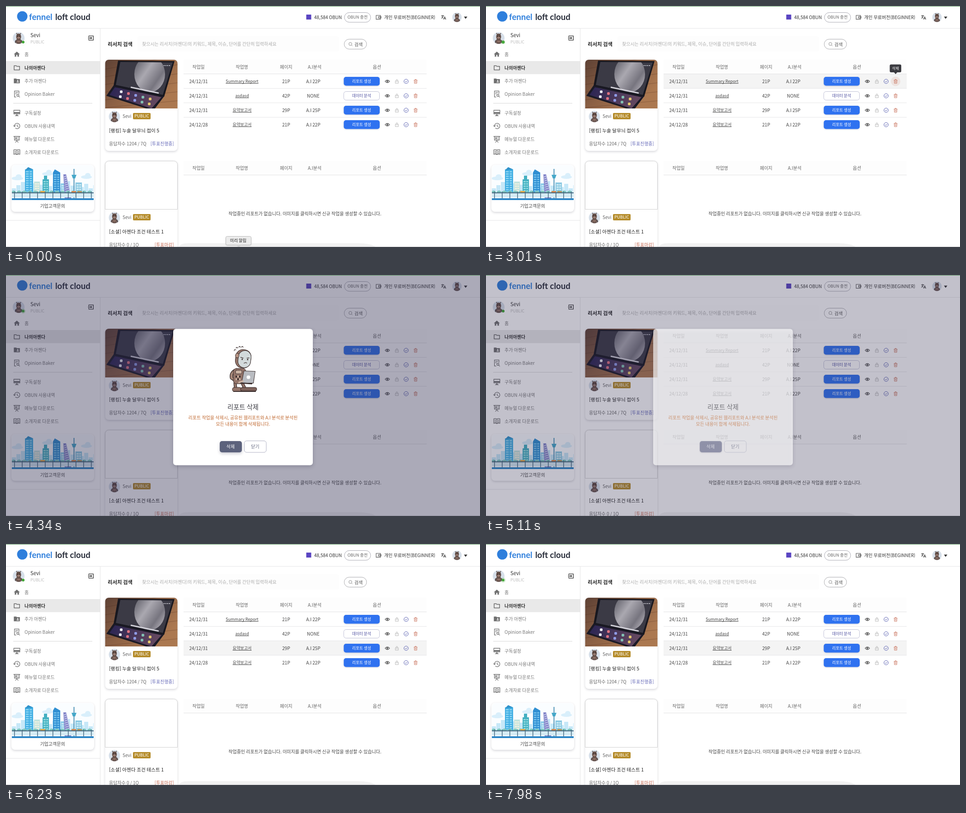
Recreate the animation shown at these times as an HTML page with a canvas. Size 1049 by 534 pixels, loop 8 s.

```html
<!DOCTYPE html>
<html lang="ko">
<head>
<meta charset="utf-8">
<title>Report list</title>
<style>
html, body { margin: 0; width: 100%; height: 100%; overflow: hidden; background: #fff; }
canvas { display: block; width: 1049px; height: 534px; }
</style>
</head>
<body>
<canvas id="stage"></canvas>
<script>
const W = 1049, H = 534, LOOP = 8000;
const FONT = '"Noto Sans CJK KR", "Noto Sans CJK", "Noto Sans", sans-serif';
const canvas = document.getElementById('stage');
const dpr = window.devicePixelRatio || 1;
canvas.width = W * dpr;
canvas.height = H * dpr;
const g = canvas.getContext('2d');

const clamp = v => Math.min(1, Math.max(0, v));
const ramp = (t, start, length) => clamp((t - start) / length);
const easeOut = p => 1 - (1 - p) ** 3;
const easeInOut = p => p * p * (3 - 2 * p);

// y is the vertical middle of the line
function text(str, x, y, { size = 10, color = '#444', weight = 400, align = 'left', font = FONT, underline } = {}) {
  g.font = `${weight} ${size}px ${font}`;
  g.textAlign = align;
  g.fillStyle = color;
  const base = y + size * 0.37;
  g.fillText(str, x, base);
  if (underline) {
    const w = g.measureText(str).width;
    g.fillRect(x - w / 2, Math.round(base + 1), w, 1);
  }
}

function box(x, y, w, h, r, { fill, stroke, shadow } = {}) {
  g.save();
  g.beginPath();
  g.roundRect(x, y, w, h, r);
  if (shadow) {
    g.shadowColor = shadow[0];
    g.shadowBlur = shadow[1] * dpr;
    g.shadowOffsetY = shadow[2] * dpr;
  }
  if (fill) { g.fillStyle = fill; g.fill(); }
  g.shadowColor = 'transparent';
  if (stroke) { g.strokeStyle = stroke; g.lineWidth = 1; g.stroke(); }
  g.restore();
}

function rect(x, y, w, h, color) {
  g.fillStyle = color;
  g.fillRect(x, y, w, h);
}

function poly(points, color) {
  g.beginPath();
  points.forEach(([x, y]) => g.lineTo(x, y));
  g.closePath();
  g.fillStyle = color;
  g.fill();
}

function oval(x, y, rx, ry, color, stroke) {
  g.beginPath();
  g.ellipse(x, y, rx, ry, 0, 0, Math.PI * 2);
  g.fillStyle = color;
  g.fill();
  if (stroke) { g.strokeStyle = stroke; g.lineWidth = 1; g.stroke(); }
}

function line(d, color, width = 1) {
  g.strokeStyle = color;
  g.lineWidth = width;
  g.stroke(new Path2D(d));
}

const icons = {
  home: 'M12 3L2 12h3v8h5v-6h4v6h5v-8h3z',
  folder: 'M3 5h7l2 2h9v12H3z',
  shared: 'M2 4h8l2 2h10v14H2zM13 11a2 2 0 1 1 4 0a2 2 0 1 1-4 0zM11 17q0-3 4-3t4 3z',
  report: 'M10 22H4V2h15v9M7 7h9M7 11h4M19 16a3.5 3.5 0 1 1-7 0a3.5 3.5 0 1 1 7 0zM18 19l4 4',
  screen: 'M2 3h20v12H2zM2 10h20M2 12h20M12 15v3M8 21l4-3 4 3z',
  history: 'M4 12a9 9 0 1 1 3 6.5M1 10l3 4 4-4M13 7v5l4 3',
  board: 'M1 3h22M4 3v12h16V3M12 15v3M7 23l5-5 5 5M8 7h3v4H8zM14 7h3M14 11h3',
  book: 'M12 5Q7 2 2 4v15q5-2 10 1q5-3 10-1V4q-5-2-10 1v15M5 8h4M5 12h4M5 16h4M15 8h4M15 12h4M15 16h4',
  exit: 'M4 9V4h17v16H4v-5M1 12h14M11 8l4 4-4 4',
  eye: 'M1 12Q12-1 23 12Q12 25 1 12zM15 12a3 3 0 1 1-6 0a3 3 0 1 1 6 0z',
  lock: 'M4 10h16v12H4zM8 10V6a4 4 0 0 1 8 0v4M12 14v3',
  check: 'M22 12a10 10 0 1 1-20 0a10 10 0 1 1 20 0zM7 12l4 4 6-7',
  trash: 'M3 6h18M9 6V2h6v4M5 6l1 16h12l1-16M10 10v8M14 10v8',
  language: 'M2 5h13M8 2v3M12 5Q10 12 3 17M5 8q2 5 7 8M13 22l5-12 5 12M15 18h6',
  wallet: 'M3 4h18v16H3zM13 9h10v6H13z',
  search: 'M19 11a8 8 0 1 1-16 0a8 8 0 1 1 16 0zM17 17l5 5'
};

function icon(name, x, y, size, color, filled, width = 2) {
  g.save();
  g.translate(x - size / 2, y - size / 2);
  g.scale(size / 24, size / 24);
  const path = new Path2D(icons[name]);
  if (filled) {
    g.fillStyle = color;
    g.fill(path, 'evenodd');
  } else {
    g.strokeStyle = color;
    g.lineWidth = width;
    g.stroke(path);
  }
  g.restore();
}

function avatar(x, y, r) {
  g.save();
  g.translate(x, y);
  g.scale(r / 13, r / 13);
  oval(0, 0, 13, 13, '#d6dfe9');
  g.beginPath();
  g.arc(0, 0, 13, 0, Math.PI * 2);
  g.clip();
  line('M-3-8l-2-3M3-8l2-3', '#5a4b47', 1.5);
  oval(0, 8, 6, 8, '#6b5650');
  line('M-6 5q-2 4-1 8M6 5q2 4 1 8', '#4c3f3d', 2);
  oval(0, -3, 5.5, 7, '#655049');
  oval(0, -1, 3.2, 2.6, '#9a7c72');
  oval(-2, -4, 1, 1, '#211b1b');
  oval(2, -4, 1, 1, '#211b1b');
  rect(-3, 6, 6, 3, '#937469');
  g.restore();
}

function header() {
  oval(36, 23, 11.5, 11.5, '#2f7fdc');
  const logo = { size: 18.5, weight: 700, font: 'Lato, sans-serif' };
  text('fennel', 51, 24, { ...logo, color: '#2f7fdc' });
  text('loft cloud', 109, 24, { ...logo, color: '#262b38' });
  box(664.5, 19, 11, 11, 0, { fill: '#5a45c2' });
  text('48,584 OBUN', 682, 25, { color: '#333', weight: 500 });
  box(749, 14.5, 58, 21.5, 11, { stroke: '#a9a9b2' });
  text('OBUN 충전', 778, 25, { size: 9.1, color: '#666', align: 'center' });
  icon('wallet', 824, 25, 13, '#555');
  text('개인 무료버전(BEGINNER)', 837, 25, { color: '#333', weight: 500 });
  icon('language', 968, 25, 12, '#444', false, 2.4);
  avatar(998, 25, 10.5);
  poly([[1013.5, 23.5], [1021, 23.5], [1017.2, 28.5]], '#333');
  rect(0, 49, W, 1, '#e6e6e8');
}

const menu = [
  ['home', '홈', 107, true], ['folder', '나의아젠다', 137], ['shared', '추가 아젠다', 166, true],
  ['report', 'Opinion Baker', 195], ['screen', '구독설정', 237], ['history', 'OBUN 사용내역', 266],
  ['board', '메뉴얼 다운로드', 295], ['book', '소개자료 다운로드', 324]
];

const cardShadow = ['rgba(50,50,70,.2)', 5, 2];

function sidebar(t) {
  rect(208, 50, 1, H, '#e4e4e6');
  rect(0, 474.5, 208, 1, '#e4e4e6');
  avatar(28, 71, 13);
  statusDot(t);
  text('Sevi', 54, 65, { size: 11.2, color: '#333', weight: 500 });
  text('PUBLIC', 54, 80, { size: 8.9, color: '#bdbdbd' });
  icon('exit', 188, 71, 14, '#333', false, 2.3);
  rect(0, 122, 208, 29, '#e9e9e9');
  for (const [name, label, y, filled] of menu) {
    const active = y === 137;
    icon(name, 24, y, 16, active ? '#555' : '#707070', filled, 1.9);
    text(label, 41, y, { color: active ? '#333' : '#777', weight: active ? 700 : 400 });
  }
  rect(16, 215, 175, 1, '#d8d8d8');
  box(12, 352, 183, 104, 8, { fill: '#fff', shadow: cardShadow });
  city();
  text('기업고객문의', 103, 443, { color: '#444', align: 'center' });
}

function statusDot(t) {
  const p = ((t - 200 + 1200) % 1200) / 1200;
  const e = easeInOut(p);
  g.save();
  g.globalAlpha = 1 - e;
  g.beginPath();
  g.arc(38, 80, 3 * (0.8 + 1.6 * e), 0, Math.PI * 2);
  g.strokeStyle = '#43a838';
  g.lineWidth = 0.8;
  g.stroke();
  g.restore();
  oval(38, 80, 3, 3, '#43a838');
}

function city() {
  g.save();
  g.beginPath();
  g.roundRect(13, 353, 181, 77, [8, 8, 0, 0]);
  g.clip();
  rect(13, 353, 181, 77, '#fafdff');
  for (const [x, y, w] of [[25, 382, 26], [92, 372, 24], [178, 379, 24]]) {
    oval(x, y, w / 2, 4, '#d9effb');
    oval(x + 3, y - 4, w / 4, 5, '#d9effb');
  }
  for (let i = 0; i < 19; i++) {
    const h = 12 + (i * 7 % 17);
    rect(13 + i * 10, 416 - h, 9, h, '#c6e8f8');
  }
  tower(42, 362, 18, '#41aee3', '#92d8f4');
  poly([[42, 364], [49, 357], [60, 362]], '#2f92ca');
  tower(62, 389, 13, '#c5e4de', '#f5f2e2');
  tower(81, 384, 14, '#43b0c2', '#9adfe2');
  rect(84, 376, 7, 8, '#43b0c2');
  tower(104, 369, 16, '#2f8fd2', '#78c5ef');
  poly([[104, 369], [108, 362], [120, 369]], '#2f8fd2');
  tower(121, 393, 10, '#8ecce9', '#d8f1fa');
  poly([[127, 373], [133, 373], [145, 428], [130, 428]], '#8285c8');
  for (let i = 0; i < 11; i++) line(`M${128 + i * .45} ${379 + i * 4.5}l${7 + i * .5}-3`, '#cfd0ee', 1.5);
  rect(149.5, 361, 2, 67, '#4b91b6');
  poly([[145, 374], [156, 374], [153, 382], [148, 382]], '#45a8c9');
  tower(154, 391, 14, '#8ecae3', '#d7f1f7');
  for (let x = 17; x < 194; x += 12) oval(x, 413, 5, 4, '#7cc4bd');
  rect(13, 413, 181, 2, '#47697f');
  rect(13, 415, 181, 9, '#d4ebf4');
  for (let x = 18; x < 194; x += 17) rect(x, 411, 1.5, 15, '#47697f');
  rect(13, 426, 181, 4, '#2d86c6');
  for (const [x, c] of [[76, '#e8a640'], [145, '#d6854e'], [158, '#b3945d']]) rect(x, 410, 10, 3, c);
  g.restore();
}

function tower(x, y, w, dark, light) {
  rect(x, y, w, 424 - y, dark);
  for (let r = y + 4; r < 420; r += 5) {
    rect(x + 2, r, w * .35, 2.5, light);
    rect(x + w * .58, r, w * .28, 2.5, light);
  }
}

function photo() {
  g.save();
  g.beginPath();
  g.roundRect(219.5, 119, 160, 108, [8, 8, 0, 0]);
  g.clip();
  const wood = g.createLinearGradient(219, 119, 330, 227);
  wood.addColorStop(0, '#5c4034');
  wood.addColorStop(.5, '#8b6044');
  wood.addColorStop(1, '#ab7850');
  rect(219, 119, 161, 108, wood);
  for (let i = 0; i < 7; i++) line(`M219 ${140 + i * 17}l161 ${i * 3 - 30}`, 'rgba(60,34,20,.2)', 1.5);
  // upright half with its wallpaper
  const screen = [[253, 124], [369, 125], [347, 197], [243, 175]];
  poly([[248, 121], [373, 122], [350, 201], [238, 177]], '#17171f');
  poly(screen, '#3b3a45');
  g.save();
  g.beginPath();
  screen.forEach(p => g.lineTo(...p));
  g.clip();
  const orb = g.createLinearGradient(282, 125, 354, 175);
  orb.addColorStop(0, '#5d5c66');
  orb.addColorStop(.4, '#aaa8b0');
  orb.addColorStop(.75, '#77757f');
  orb.addColorStop(1, '#b3b0b8');
  oval(318, 151, 34, 40, orb);
  g.restore();
  for (let i = 0; i < 4; i++) rect(349 + i * 4, 131, 2, 2, '#d5d5dd');
  // lying half with its icons
  const deck = g.createLinearGradient(235, 180, 325, 225);
  deck.addColorStop(0, '#2b2553');
  deck.addColorStop(1, '#63475f');
  poly([[238, 176], [350, 200], [326, 232], [222, 199]], '#1b1a26');
  poly([[241, 180], [344, 202], [322, 227], [229, 197]], deck);
  line('M276 180L338 193', '#cfced6', 3);
  const dots = ['#e9e9ef', '#8e9ae4', '#e3c76c', '#dd7280', '#82c0b3'];
  for (let i = 0; i < 10; i++) {
    const row = Math.floor(i / 5), col = i % 5;
    box(252 + col * 16 - row * 2, 187 + row * 11 + col * 4, 6, 6, 2, { fill: dots[(i * 3) % 5] });
  }
  g.restore();
}

function card(y, title, count, state, color, image) {
  box(219.5, y, 160, 202, 8, { fill: '#fff', shadow: cardShadow });
  if (image) photo();
  else box(219.5, y + .5, 160, 107, [8, 8, 0, 0], { stroke: '#cfcfcf' });
  avatar(240, y + 126, 12.5);
  text('Sevi', 258, y + 125, { color: '#666' });
  box(281, y + 118, 39, 14, 2, { fill: '#b58c2b' });
  text('PUBLIC', 300.5, y + 125, { size: 9.4, color: '#fff', align: 'center' });
  text(title, 228, y + 157, { size: 10.7, color: '#222', weight: 500 });
  text(count, 228, y + 186.5, { color: '#666' });
  text(state, 371.5, y + 186.5, { size: 9.8, color, align: 'right' });
}

function tableHead(y) {
  rect(393, y - 16, 538, 31, '#fdfdfd');
  [['작업일', 426], ['작업명', 522], ['페이지', 620], ['A.I분석', 683], ['옵션', 821]]
    .forEach(([label, x]) => text(label, x, y, { color: '#666', align: 'center' }));
  rect(393, y + 15, 538, 1, '#e2e2e4');
}

const rows = [
  ['24/12/31', 'Summary Report', '21P', 'A.I 22P'],
  ['24/12/31', 'asdasd', '42P', 'NONE'],
  ['24/12/31', '요약보고서', '29P', 'A.I 25P'],
  ['24/12/28', '요약보고서', '21P', 'A.I 22P']
];

function table(hovered, trashGlow) {
  tableHead(135);
  rows.forEach(([date, name, pages, ai], i) => {
    const y = 167 + i * 32;
    if (i === hovered) rect(393, y - 16, 538, 32, '#f4f4f4');
    if (i < 3) rect(393, y + 15, 538, 1, '#e6e6e8');
    text(date, 426, y, { align: 'center' });
    text(name, 522.5, y, { size: 9.1, align: 'center', underline: true });
    text(pages, 620, y, { align: 'center' });
    text(ai, 680, y, { align: 'center' });
    const plain = ai === 'NONE';
    if (plain) box(747.5, y - 9.5, 79, 19, 5, { fill: '#fff', stroke: '#bfc0d6' });
    else box(747.5, y - 10, 79.5, 19.5, 5, { fill: '#2f72f0', shadow: ['rgba(40,60,120,.25)', 3, 1] });
    text(plain ? '데이터 분석' : '리포트 생성', 787, y, {
      size: 8.7, weight: 500, align: 'center', color: plain ? '#4b4d9f' : '#fff'
    });
    if (i === 0 && trashGlow) oval(906.5, y, 10.5, 10.5, `rgba(201,117,95,${.13 * trashGlow})`);
    icon('eye', 844, y, 11, '#333', false, 2.4);
    icon('lock', 865, y, 10, '#aaa');
    icon('check', 885.5, y, 11.5, '#5259ad');
    icon('trash', 906.5, y, 10.5, '#c8705b');
  });
}

function content(hovered, trashGlow) {
  text('리서치 검색', 225, 85, { size: 11.4, color: '#222', weight: 700 });
  box(291, 67, 446, 34, 5, { fill: '#fdfdfd' });
  text('찾으시는 리서치(아젠다)의 키워드, 제목, 이슈, 단어를 간단히 입력하세요', 301, 84, { color: '#aaa' });
  box(748.5, 73.5, 49.5, 22, 11, { stroke: '#a9a9ad' });
  icon('search', 762.5, 84.5, 10, '#777');
  text('검색', 771, 85, { color: '#555' });
  card(119, '[랭킹] 누솔 달무늬 접이 5', '응답자수 1204 / 7Q', '[투표진행중]', '#6468b8', true);
  card(343, '[소셜] 아젠다 조건 테스트 1', '응답자수 0 / 1Q', '[투표마감]', '#c4674f', false);
  table(hovered, trashGlow);
  tableHead(359);
  text('작업중인 리포트가 없습니다. 이미지를 클릭하시면 신규 작업을 생성할 수 있습니다.', 661.5, 460, { align: 'center' });
}

function dock() {
  g.beginPath();
  g.moveTo(383, H);
  g.quadraticCurveTo(386, 525.5, 402, 525.5);
  g.lineTo(780, 525.5);
  g.quadraticCurveTo(808, 526, 818, H);
  g.fillStyle = '#f2f2f2';
  g.fill();
}

function dockLabel(alpha) {
  g.save();
  g.globalAlpha = alpha;
  box(486.5, 510.5, 56, 19, 3, { fill: '#ececec', stroke: '#bcbcbc', shadow: ['rgba(0,0,0,.2)', 3, 1] });
  poly([[508, 529.5], [522, 529.5], [515, 534]], '#d5d5d5');
  text('미리 알림', 514, 520, { size: 9.3, color: '#222', weight: 500, align: 'center' });
  g.restore();
}

function tooltip(alpha) {
  g.save();
  g.globalAlpha = alpha;
  box(893.5, 129.5, 25.5, 17.5, 3, { fill: '#3b3b40' });
  poly([[903, 147], [910, 147], [906.5, 151]], '#3b3b40');
  text('삭제', 906.3, 138.3, { size: 8.2, color: '#fff', weight: 500, align: 'center' });
  g.restore();
}

function robot() {
  const ink = '#3a2d2c', brown = '#94756a', tan = '#cbb2a2';
  g.save();
  g.lineJoin = g.lineCap = 'round';
  line('M505 168l1-3 3 1M509 162l2-2 2 2M515 160l2-2 2 2M521 160l2-2 2 2', ink, 1.1);
  line('M507 240l1 10M524 242l4 8', ink, 7);
  line('M507 240l1 10M524 242l4 8', brown, 4.5);
  box(501, 249, 20, 9, 4, { fill: brown, stroke: ink });
  box(519, 249, 36, 8, 4, { fill: '#7d625a', stroke: ink });
  rect(503, 257, 50, 2, ink);
  line('M506 212q-9 6-7 16l9 6', ink, 7);
  line('M506 212q-9 6-7 16l9 6', '#a9897a', 4.5);
  box(503, 207, 28, 34, 7, { fill: brown, stroke: ink });
  box(508, 211, 14, 8, 2, { fill: tan, stroke: ink });
  for (let i = 0; i < 6; i++) rect(508 + (i % 3) * 4, 223 + Math.floor(i / 3) * 6, 3, 4, i % 2 ? tan : ink);
  g.save();
  g.translate(524, 185);
  g.rotate(.12);
  box(-16, -20, 34, 41, 16, { fill: brown, stroke: ink });
  box(-10, -18, 28, 38, 14, { fill: '#d2dadb', stroke: ink });
  line('M-5-2l6 1M9-2l5-1', ink, 1.2);
  oval(-1, 2, 1.4, 1.6, ink);
  oval(11, 1, 1.4, 1.6, ink);
  line('M4 10q3-3 6-1', ink, 1.2);
  oval(-13, -5, 4, 5, '#b59484', ink);
  g.restore();
  poly([[526, 212], [552, 213], [548, 240], [521, 240]], ink);
  poly([[527, 213], [551, 214], [547, 239], [522, 239]], '#b9bcc1');
  oval(536.5, 226.5, 4, 4, '#fff');
  line('M517 239l27 2', ink, 2.5);
  line('M516 238l8-3', tan, 4);
  g.restore();
}

function mix(a, b, p) {
  return `rgb(${a.map((v, i) => Math.round(v + (b[i] - v) * p)).join()})`;
}

function modal(t, alpha) {
  const press = ramp(t, 3850, 250) * (1 - ramp(t, 4900, 200));
  g.save();
  g.globalAlpha = alpha;
  box(370, 119.5, 309, 302, 6, { fill: '#fff', shadow: ['rgba(40,38,60,.25)', 9, 3] });
  if (t >= 3200 && t < 5040) robot();
  text('리포트 삭제', 524.5, 293, { size: 14.3, color: '#3c3c44', align: 'center' });
  text('리포트 작업을 삭제시, 공유된 웹리포트와 A.I 분석로 분석된', 524.5, 316, { color: '#c06a32', align: 'center' });
  text('모든 내용이 함께 삭제됩니다.', 524.5, 330, { color: '#c06a32', align: 'center' });
  box(473, 368, 49, 25, 5, {
    fill: mix([116, 120, 150], [92, 98, 124], press),
    shadow: ['rgba(50,50,80,.25)', 3 + 3 * press, 1 + 2 * press]
  });
  text('삭제', 497, 380.5, { color: '#fff', weight: 500, align: 'center' });
  box(527.5, 367.5, 48.5, 25.5, 5, { stroke: '#aeb0c2' });
  text('닫기', 551.5, 380.5, { color: '#62667f', align: 'center' });
  g.restore();
}

function hoveredRow(t) {
  if (t >= 1700 && t < 3100) return 0;
  return t >= 5250 ? 2 : -1;
}

function draw(t) {
  g.setTransform(dpr, 0, 0, dpr, 0, 0);
  rect(0, 0, W, H, '#fff');
  header();
  sidebar(t);
  const glow = ramp(t, 2380, 150) * (1 - ramp(t, 3130, 100));
  content(hoveredRow(t), glow);
  dock();

  const tip = ramp(t, 2450, 200) * (1 - ramp(t, 3050, 125));
  if (tip > 0) tooltip(tip);
  const label = 1 - ramp(t, 70, 490);
  if (label > 0) dockLabel(label);

  const shown = easeOut(ramp(t, 3050, 165)) * (1 - ramp(t, 5040, 210) ** 1.2);
  if (shown > 0) {
    rect(0, 0, W, H, `rgba(47,44,78,${.4 * shown})`);
    modal(t, shown ** 1.3);
  }
  rect(0, 0, W, 1, '#4f8f55');
  rect(0, H - 1, W, 1, 'rgba(90,90,100,.35)');
}

const start = performance.now();
function tick(now) {
  draw(Math.max(0, now - start) % LOOP);
  requestAnimationFrame(tick);
}
draw(0);
requestAnimationFrame(tick);
</script>
</body>
</html>
```
